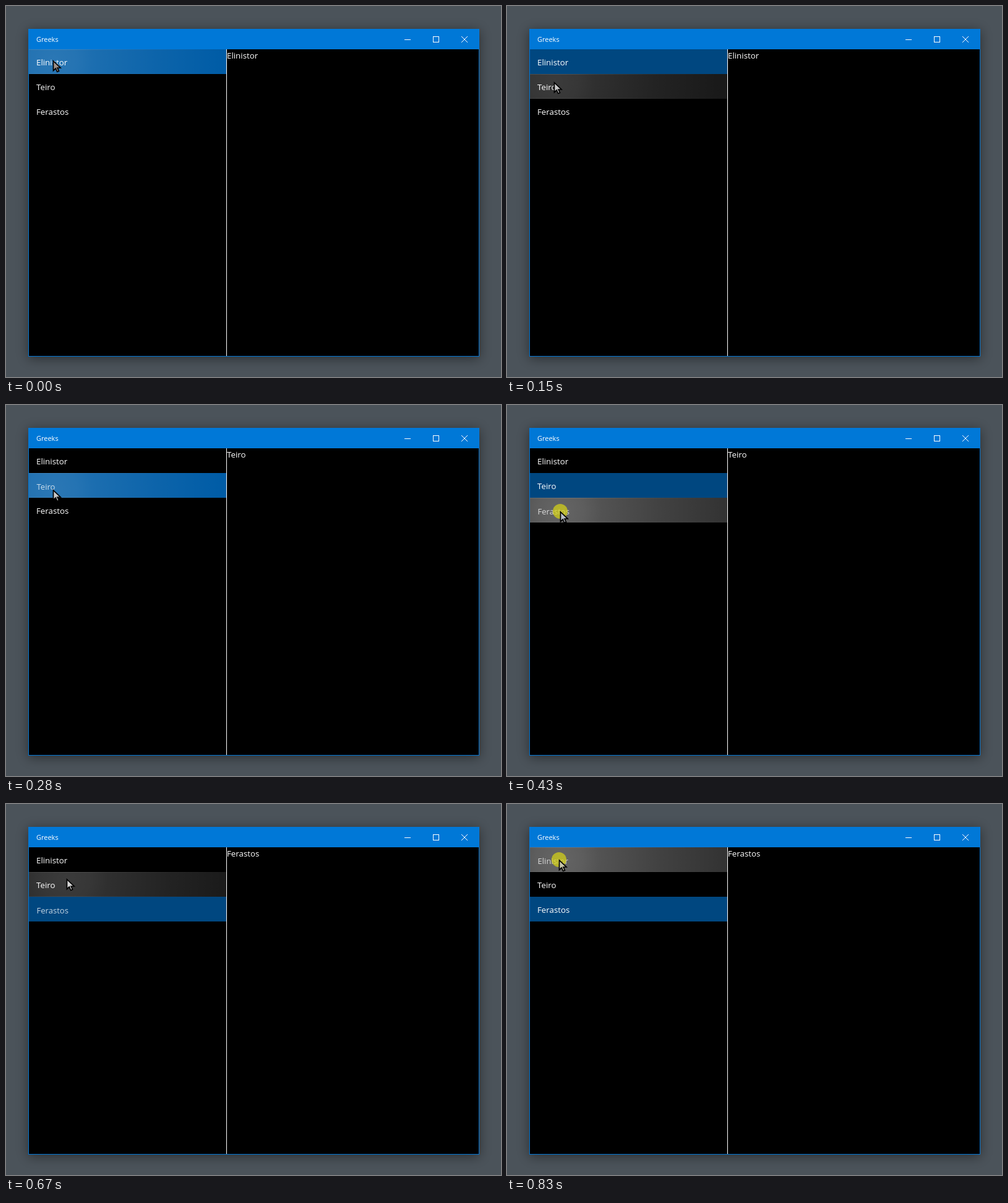
Animation, 800 px wide and 600 px high, one loop 930 ms. Source, as an HTML page with a canvas:

```html
<!DOCTYPE html>
<html lang="en">
<head>
<meta charset="utf-8">
<style>
  html, body { margin: 0; width: 100%; height: 100%; overflow: hidden; background: #4b535a; }
  canvas { display: block; }
</style>
</head>
<body>
<canvas id="stage" width="800" height="600"></canvas>
<script>
const ctx = document.getElementById('stage').getContext('2d');
const LOOP = 930;
const ROW = { x: 37, y: 70, w: 319, h: 40 };
const names = ['Elinistor', 'Teiro', 'Ferastos'];

// Row looks: base colour, strength of the light around the pointer
const looks = {
  hover: ['#191919', 0.15],
  press: ['#323232', 0.25],
  selectedHover: ['#005ca6', 0.17],
  selectedPress: ['#0069bd', 0.21]
};

// at: start in ms, tip: pointer tip, row: row under the pointer, dim: row with shrunken text
const poses = [
  { at: 0,   tip: [76, 88],  row: 0, look: 'selectedHover', selected: 0, shown: 0, fill: '#a1928a' },
  { at: 90,  tip: [76, 87],  row: 0, look: 'selectedPress', selected: 0, shown: 0, fill: '#15150a', click: true, dim: 0 },
  { at: 150, tip: [76, 123], row: 1, look: 'hover', selected: 0, shown: 0, fill: '#c9c9c9' },
  { at: 220, tip: [75, 135], row: 1, look: 'press', selected: 0, shown: 0, fill: '#d8d59a', click: true, dim: 1 },
  { at: 280, tip: [76, 137], row: 1, look: 'selectedHover', selected: 1, shown: 1, fill: '#c9c9c9', dim: 1 },
  { at: 350, tip: [82, 162], row: 2, look: 'hover', selected: 1, shown: 1, fill: '#c9c9c9' },
  { at: 430, tip: [86, 172], row: 2, look: 'press', selected: 1, shown: 1, fill: '#b9bfc9', click: true, dim: 2 },
  { at: 490, tip: [88, 171], row: 2, look: 'selectedHover', selected: 2, shown: 2, fill: '#c9c9c9', dim: 2 },
  { at: 580, tip: [95, 152], row: 2, look: 'selectedHover', selected: 2, shown: 2, fill: '#d59a78', dim: 2 },
  { at: 670, tip: [98, 121], row: 1, look: 'hover', selected: 2, shown: 2, fill: '#d6d6d6', dim: 2 },
  { at: 740, tip: [92, 98],  row: 0, look: 'hover', selected: 2, shown: 2, fill: '#d6d6d6' },
  { at: 830, tip: [84, 90],  row: 0, look: 'press', selected: 2, shown: 2, fill: '#c8c6aa', click: true, dim: 0 }
];

function box(x, y, w, h, color) {
  ctx.fillStyle = color;
  ctx.fillRect(x, y, w, h);
}

function text(label, x, y, size = 13.3, color = '#fff') {
  ctx.font = `${size}px "Open Sans", "Noto Sans", sans-serif`;
  ctx.fillStyle = color;
  ctx.fillText(label, x, y);
}

function drawWindow() {
  box(0, 0, 800, 600, '#4b535a');
  ctx.save();
  ctx.shadowColor = 'rgba(0,0,0,.45)';
  ctx.shadowBlur = 18;
  ctx.shadowOffsetY = 3;
  box(36, 37, 729, 530, '#0078d7');
  ctx.restore();
  box(37, 70, 727, 496, '#000');
  box(356, 70, 1, 496, '#fff');
  text('Greeks', 49, 58, 11);

  ctx.strokeStyle = '#fff';
  ctx.lineWidth = 1;
  box(644, 54, 10, 1, '#fff');
  ctx.strokeRect(690.5, 49.5, 9, 9);
  ctx.stroke(new Path2D('M736 49l10 10M746 49l-10 10'));
}

function glow([x, y], strength) {
  const light = ctx.createRadialGradient(x, y, 0, x, y, 275);
  const stops = [[0, 1], [0.14, 0.85], [0.24, 0.65], [0.6, 0.3], [1, 0]];
  for (const [at, part] of stops) {
    light.addColorStop(at, `rgba(255,255,255,${strength * part})`);
  }
  return light;
}

function drawList({ tip, row, look, selected, dim }) {
  const top = i => ROW.y + i * ROW.h;
  box(ROW.x, top(selected), ROW.w, ROW.h, '#004780');

  const [base, strength] = looks[look];
  box(ROW.x, top(row), ROW.w, ROW.h, base);
  box(ROW.x, top(row), ROW.w, ROW.h, glow(tip, strength));
  box(ROW.x, top(row), ROW.w, 1, glow(tip, 0.12));
  box(ROW.x, top(row) + ROW.h - 1, ROW.w, 1, glow(tip, 0.08));

  names.forEach((name, i) => {
    if (i === dim) text(name, 49.5, top(i) + 26.5, 13.1, 'rgba(255,255,255,.76)');
    else text(name, 49, top(i) + 26);
  });
}

const arrow = new Path2D('M0 1V16.5L3.8 13L6.2 18.5L9 17.3L6.6 12H11.5Z');

function drawPointer({ tip: [x, y], fill, click }) {
  if (click) {
    ctx.fillStyle = 'rgba(216,213,20,.7)';
    ctx.beginPath();
    ctx.arc(x, y, 12, 0, Math.PI * 2);
    ctx.fill();
  }
  ctx.save();
  ctx.translate(x + 0.5, y);
  ctx.fillStyle = fill;
  ctx.fill(arrow);
  ctx.strokeStyle = '#000';
  ctx.lineWidth = 1.7;
  ctx.stroke(arrow);
  ctx.restore();
}

function draw() {
  const time = performance.now() % LOOP;
  const pose = poses.findLast(p => p.at <= time);
  drawWindow();
  drawList(pose);
  text(names[pose.shown], 357, 85);
  drawPointer(pose);
  requestAnimationFrame(draw);
}
draw();
</script>
</body>
</html>
```
